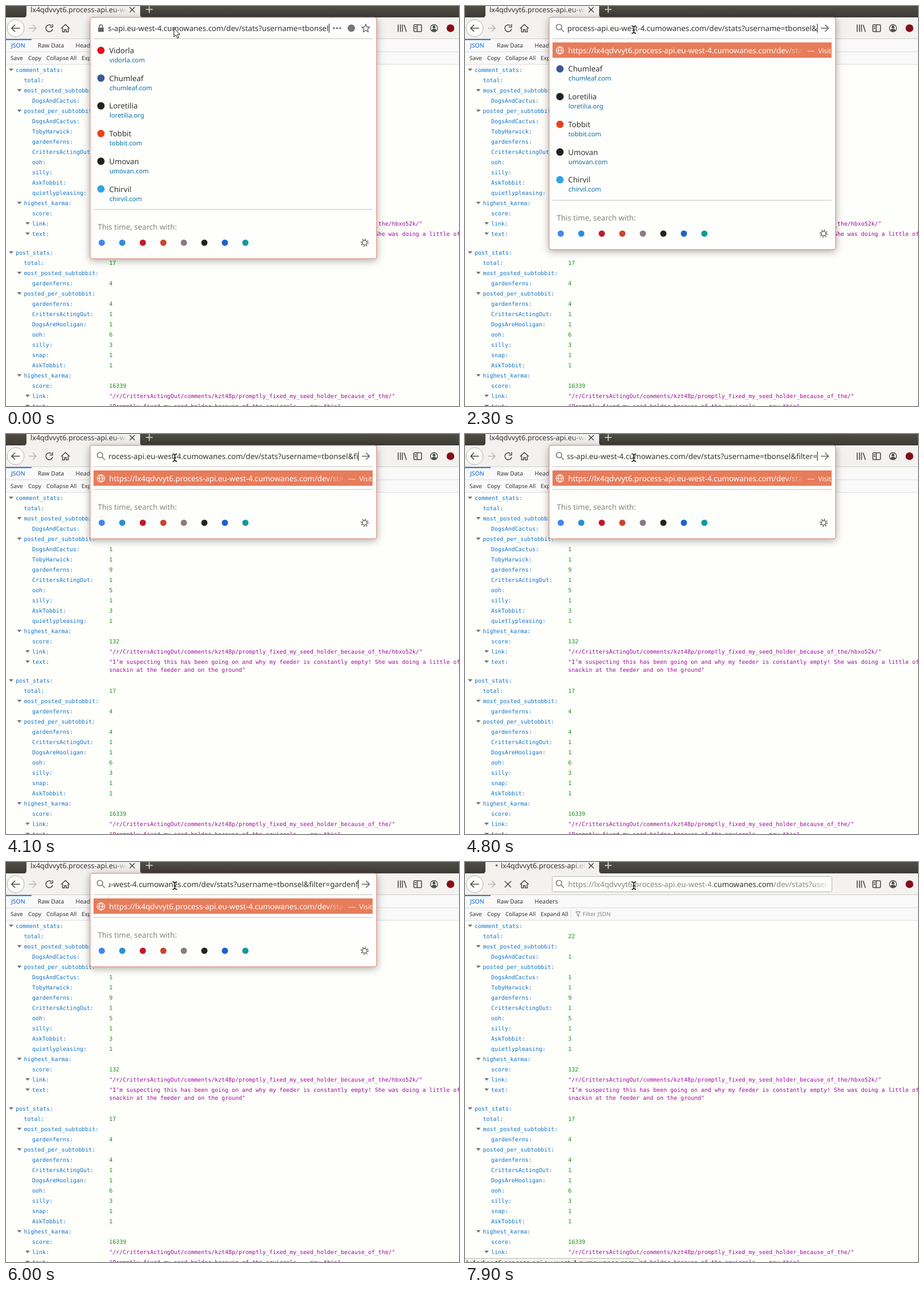
An HTML page for the animation above (8000 ms loop, 797 by 703 pixels).

```html
<!DOCTYPE html>
<html lang="en">
<head>
<meta charset="utf-8">
<title>Stats API</title>
<style>
html, body { margin: 0; width: 100%; height: 100%; overflow: hidden; background: #fefefb; }
svg { display: block; text-rendering: geometricPrecision; }
text { font: 13.3px "Noto Sans", "Open Sans", sans-serif; fill: #333; white-space: pre; }
.mono text { font: 9.967px "DejaVu Sans Mono", monospace; }
.mono .key { fill: #1073c8; }
.mono .num { fill: #149214; }
.mono .str { fill: #9c0c9c; }
.bar text { font-size: 9.9px; }
.bar .tab { font-size: 10.4px; }
.site { font-size: 11.3px; fill: #0b6fa4; }
.line { fill: none; stroke: #4b4b49; stroke-width: 1.6; }
.grey { fill: #858585; }
#frame { fill: #fefefc; stroke: #e0826a; filter: drop-shadow(0 3px 7px #0005); }
</style>
</head>
<body>
<svg width="797" height="703" viewBox="0 0 797 703">
  <defs>
    <linearGradient id="dark" x2="0" y2="1"><stop stop-color="#4f4d45"/><stop offset="1" stop-color="#3d3b36"/></linearGradient>
    <linearGradient id="tabFade" gradientUnits="userSpaceOnUse" x1="188" x2="213"><stop stop-color="#333"/><stop offset="1" stop-color="#333" stop-opacity="0"/></linearGradient>
    <linearGradient id="urlFade" gradientUnits="userSpaceOnUse" x1="612" x2="644"><stop stop-color="#858585"/><stop offset="1" stop-color="#858585" stop-opacity="0"/></linearGradient>
    <linearGradient id="rowFade" gradientUnits="userSpaceOnUse" x1="560" x2="597"><stop stop-color="#fff"/><stop offset="1" stop-color="#fff" stop-opacity="0"/></linearGradient>
    <clipPath id="field"><rect x="180" y="25" width="441" height="28"/></clipPath>
    <clipPath id="tabClip"><rect x="40" width="172" height="20"/></clipPath>
  </defs>

  <g id="json" class="mono"></g>

  <rect width="797" height="20" fill="url(#dark)"/>
  <path d="M33 20Q36 19 36 15V0H236V15Q236 19 239 20Z" fill="#f2f1ee"/>
  <g clip-path="url(#tabClip)"><text id="title" y="10.5" style="font-size:12.6px" fill="url(#tabFade)"></text></g>
  <circle id="dot" cy="6" r="2" fill="#777"/>
  <path class="line" d="M217.500 2l9 9m0-9l-9 9"/>
  <path class="line" d="M246 6h12M252 0v12" style="stroke:#dedbd2"/>

  <rect y="20" width="797" height="38" fill="#f3f2ef"/>
  <path d="M0 57.500H797" stroke="#cfcdc9"/>
  <circle cx="17" cy="39" r="15" fill="#fcfcfa" stroke="#b3b2af"/>
  <path class="line" d="M24.500 39H10m6-6l-6 6 6 6"/>
  <path class="line" d="M40 39h13m-6-6l6 6-6 6" style="stroke:#bbbab7"/>
  <path id="reload" class="line" d="M80 34.500a6 6 0 1 0 2 6M82 32v5h-5"/>
  <path id="stop" class="line" d="M70 33.500l11 11m0-11l-11 11"/>
  <path class="line" d="M97 39.500l7.500-7 7.500 7M99.500 38.500v7h3.500v-4h3v4h3.500v-7"/>
  <path class="line" d="M690 32.500v13M694 32.500v13M697.500 32.500v13M700.500 33l4 12.500"/>
  <path class="line" d="M719 33h10.500q1.500 0 1.500 1.500v9q0 1.500-1.500 1.500h-10.500q-1.500 0-1.500-1.500v-9q0-1.500 1.500-1.500M723.500 33v12M719 36.500h3M719 39.500h3"/>
  <circle class="line" cx="753" cy="39" r="6.200" style="stroke-width:1.400"/>
  <path d="M748.500 43q1-3 4.500-3t4.500 3q-4.500 3.500-9 0" fill="#4b4b49"/><circle cx="753" cy="37" r="2.500" fill="#4b4b49"/>
  <circle cx="782" cy="39" r="6.800" fill="#850d18"/>

  <g class="bar">
    <rect y="58" width="797" height="45" fill="#f9f9f9"/>
    <path d="M0 80.500H797M0 102.500H797M186.500 83v16" stroke="#dededf"/>
    <rect y="58" width="45" height="2" fill="#0a84ff"/>
    <text class="tab" x="9" y="73" style="fill:#0060df">JSON</text>
    <text class="tab" x="56" y="73">Raw Data</text>
    <text class="tab" x="122.500" y="73">Headers</text>
    <text x="8" y="94.500">Save</text>
    <text x="39" y="94.500">Copy</text>
    <text x="71" y="94.500">Collapse All</text>
    <text x="133" y="94.500">Expand All</text>
    <path class="line" d="M195 87.500h8l-3 4v4l-2-1v-3z" style="stroke:#777;stroke-width:1"/>
    <text x="207" y="94.500" class="grey">Filter JSON</text>
  </g>

  <g id="loading">
    <rect x="153.500" y="25.500" width="492" height="27" rx="3" fill="#fefefc" stroke="#b9b7b3"/>
    <text id="address" x="181.500" y="44" class="grey"></text>
  </g>
  <g id="status">
    <path d="M-1 696.500H304q3 0 3 3V704H-1z" fill="#f3f2ef" stroke="#b9b7b3"/>
    <text id="statusText" x="2" y="709" style="font-size:12.500px"></text>
  </g>

  <g id="popup">
    <rect id="frame" x="148" y="20" width="504" rx="3"/>
    <path d="M154 57.500H645" stroke="#c4c3c0"/>
    <g clip-path="url(#field)"><text id="typed" y="44" text-anchor="end"></text></g>
    <rect id="caret" y="31" width="1" height="16" fill="#111"/>
    <g id="idle">
      <rect x="162" y="38" width="10" height="7.500" rx="1" fill="#666"/>
      <path class="line" d="M164 38v-2a3 3 0 0 1 6 0v2" style="stroke:#666"/>
      <path d="M577 39h.01M582.500 39h.01M588 39h.01" stroke="#666" stroke-width="3.400" stroke-linecap="round"/>
      <circle cx="607.500" cy="39" r="6.500" fill="#777"/>
      <path id="star" class="line" style="stroke:#666;stroke-width:1.400"/>
    </g>
    <g id="visit">
      <path class="line" d="M626 39h13.500m-6-6l6 6-6 6" style="stroke:#666"/>
      <rect x="154" y="64" width="491" height="27" fill="#e77c5b"/>
      <path class="line" d="M160.500 78a6.500 6.500 0 1 0 13 0a6.500 6.500 0 1 0-13 0h13M167 71.500q-6 6.500 0 13q6-6.500 0-13" style="stroke:#fff;stroke-width:1.200"/>
      <text id="suggest" x="181.500" y="83" style="fill:url(#rowFade)"></text>
      <text x="602" y="83" style="fill:#fbe0d8">—</text>
      <text x="621.500" y="83" style="font-size:11.800px;fill:#fff2ee">Visit</text>
    </g>
    <g id="sites"></g>
    <g id="footer">
      <path d="M154 97.500H645" stroke="#c4c3c0"/>
      <text x="161.500" y="132.500" class="grey">This time, search with:</text>
      <g id="engines"></g>
      <circle class="line" cx="631" cy="156" r="4" style="stroke:#666;stroke-width:1.500"/>
      <circle class="line" cx="631" cy="156" r="6" style="stroke:#666;stroke-width:2.400;stroke-dasharray:1.600 3.112"/>
    </g>
  </g>
  <path id="lens" class="line" d="M160.500 37a4.800 4.800 0 1 0 9.600 0a4.800 4.800 0 1 0-9.600 0M169 40.500l5 5" style="stroke:#777"/>

  <path id="arrow" d="M295.500 39v15l3.500-3 2.500 5.500 2.500-1-2.500-5.500h4.500z" fill="#fff" stroke="#111"/>
  <g id="beam" fill="none">
    <path d="M293 35q4 0 4 3v7q0 3-4 3M301 35q-4 0-4 3v7q0 3 4 3M295 42h4" stroke="#fff" stroke-width="3.400"/>
    <path d="M293 35q4 0 4 3v7q0 3-4 3M301 35q-4 0-4 3v7q0 3 4 3M295 42h4" stroke="#111" stroke-width="1.500"/>
  </g>
</svg>
<script>
const $ = id => document.getElementById(id);
const LOOP = 8000;
const SUB = 'lx4qdvvyt6.process-api.eu-west-4.', DOMAIN = 'cumowanes.com';
const HOST = SUB + DOMAIN, PATH = '/dev/stats?username=tbonsel', QUERY = '&filter=gardenferns';
const LINK = '/r/CrittersActingOut/comments/kzt48p/promptly_fixed_my_seed_holder_because_of_the/';

const TREE = `comment_stats
 total 22
 most_posted_subtobbit
  DogsAndCactus 1
 posted_per_subtobbit
  DogsAndCactus 1
  TobyHarwick 1
  gardenferns 9
  CrittersActingOut 1
  ooh 5
  silly 1
  AskTobbit 3
  quietlypleasing 1
 highest_karma
  score 132
  link "${LINK}hbxo52k/"
  text "I’m suspecting this has been going on and why my feeder is constantly empty! She was doing a little of|snackin at the feeder and on the ground"
post_stats
 total 17
 most_posted_subtobbit
  gardenferns 4
 posted_per_subtobbit
  gardenferns 4
  CrittersActingOut 1
  DogsAreHooligan 1
  ooh 6
  silly 3
  snap 1
  AskTobbit 1
 highest_karma
  score 16339
  link "${LINK}"
  text "Promptly fixed my seed holder because of the squirrels... now this"`;

const text = (x, y, s, cls = '') => `<text x="${x}" y="${y}" class="${cls}">${s}</text>`;

function drawTree() {
  let y = 112, out = '';
  for (const row of TREE.split('\n')) {
    const [, indent, key, value = ''] = row.match(/^( *)(\S+) ?(.*)$/);
    const x = [17, 31.5, 46][indent.length];
    const isNumber = /^\d/.test(value);
    if (!isNumber) out += `<path d="M${x - 12} ${y - 2}h8l-4 4.500z" fill="#777"/>`;
    out += text(x, y + 3.5, key + ':', 'key');
    const lines = value.split('|');
    lines.forEach((s, i) => out += text(181.5, y + 3.5 + i * 14.5, s, isNumber ? 'num' : 'str'));
    y += 18 + (lines.length - 1) * 15;
  }
  $('json').innerHTML = out;
}

function drawSites() {
  const sites = [
    ['Vidorla', '.com', '#e2121a'], ['Chumleaf', '.com', '#3b5998'], ['Loretilia', '.org', '#222'],
    ['Tobbit', '.com', '#e8431c'], ['Umovan', '.com', '#222'], ['Chirvil', '.com', '#2fa4e7']];
  $('sites').innerHTML = sites.map(([name, tld, color], i) => {
    const y = 78 + i * 48.7;
    return `<g><circle cx="167" cy="${y}" r="6.500" fill="${color}"/>` +
      text(181.5, y + 5, name) + text(182, y + 21, name.toLowerCase() + tld, 'site') + '</g>';
  }).join('');
  const engines = ['#4285f4', '#2b8fd8', '#c0182a', '#c4472c', '#8a7a86', '#222', '#1b62d1', '#129a9c'];
  $('engines').innerHTML = engines.map((c, i) =>
    `<circle cx="${168.5 + i * 36.1}" cy="156" r="5.500" fill="${c}"/>`).join('');
}

function drawStar() {
  const points = Array.from({ length: 10 }, (_, i) => {
    const a = i * Math.PI / 5, r = i % 2 ? 3.4 : 7.2;
    return `${633 + r * Math.sin(a)} ${39.5 - r * Math.cos(a)}`;
  });
  $('star').setAttribute('d', `M${points.join('L')}Z`);
}

// time, number of typed characters
const KEYS = [[0, 0], [2300, 1], [4100, 3], [4300, 4], [4500, 5], [4600, 7], [4800, 8], [5500, 10],
  [5700, 12], [5800, 13], [5900, 14], [6000, 15], [6200, 16], [6300, 17], [6500, 18], [6700, 19]];
const CARET_OFF = [[500, 1700], [2900, 4100], [5400, 5500], [6700, 6800]];

const show = (id, on) => $(id).style.display = on ? '' : 'none';
const set = (id, name, value) => $(id).setAttribute(name, value);

function render(t) {
  const typing = t >= 2300, loading = t >= 7500;
  const drop = !typing ? 260 : t < 2500 ? 244 : 0;
  const right = typing ? 620 : 568;

  show('popup', !loading);
  show('loading', loading);
  show('reload', !loading);
  show('stop', loading);
  show('status', t >= 7600);
  show('dot', loading);
  show('idle', !typing);
  show('visit', typing);
  show('lens', typing);
  show('sites', drop);
  show('arrow', t < 200);
  show('beam', t >= 200);
  show('caret', !CARET_OFF.some(([a, b]) => t >= a && t < b));

  set('frame', 'height', 164 + drop);
  set('footer', 'transform', `translate(0 ${drop})`);
  set('sites', 'transform', `translate(0 ${typing ? -16.2 : 0})`);
  $('sites').firstChild.style.display = typing ? 'none' : '';
  set('caret', 'x', right - (typing ? 0.5 : 0));
  set('typed', 'x', right - 0.5);
  const count = KEYS.findLast(k => t >= k[0])[1];
  const typed = 'https://' + HOST + PATH + QUERY.slice(0, count);
  if ($('typed').textContent !== typed) $('typed').textContent = typed;

  set('title', 'x', loading ? 63 : 43);
  set('dot', 'cx', 51 + 6 * Math.cos(Math.floor((t - 7500) / 100) * 1.4));
}

drawTree();
drawSites();
drawStar();
$('title').textContent = HOST;
$('title').style.fill = 'url(#tabFade)';
$('statusText').textContent = HOST + '…';
$('suggest').textContent = 'https://' + HOST + '/dev/sta';
$('address').innerHTML = `https://${SUB}<tspan fill="#333">${DOMAIN}</tspan><tspan fill="url(#urlFade)">/dev/stats?user</tspan>`;

function tick() {
  render(performance.now() % LOOP);
  requestAnimationFrame(tick);
}
tick();
</script>
</body>
</html>
```
